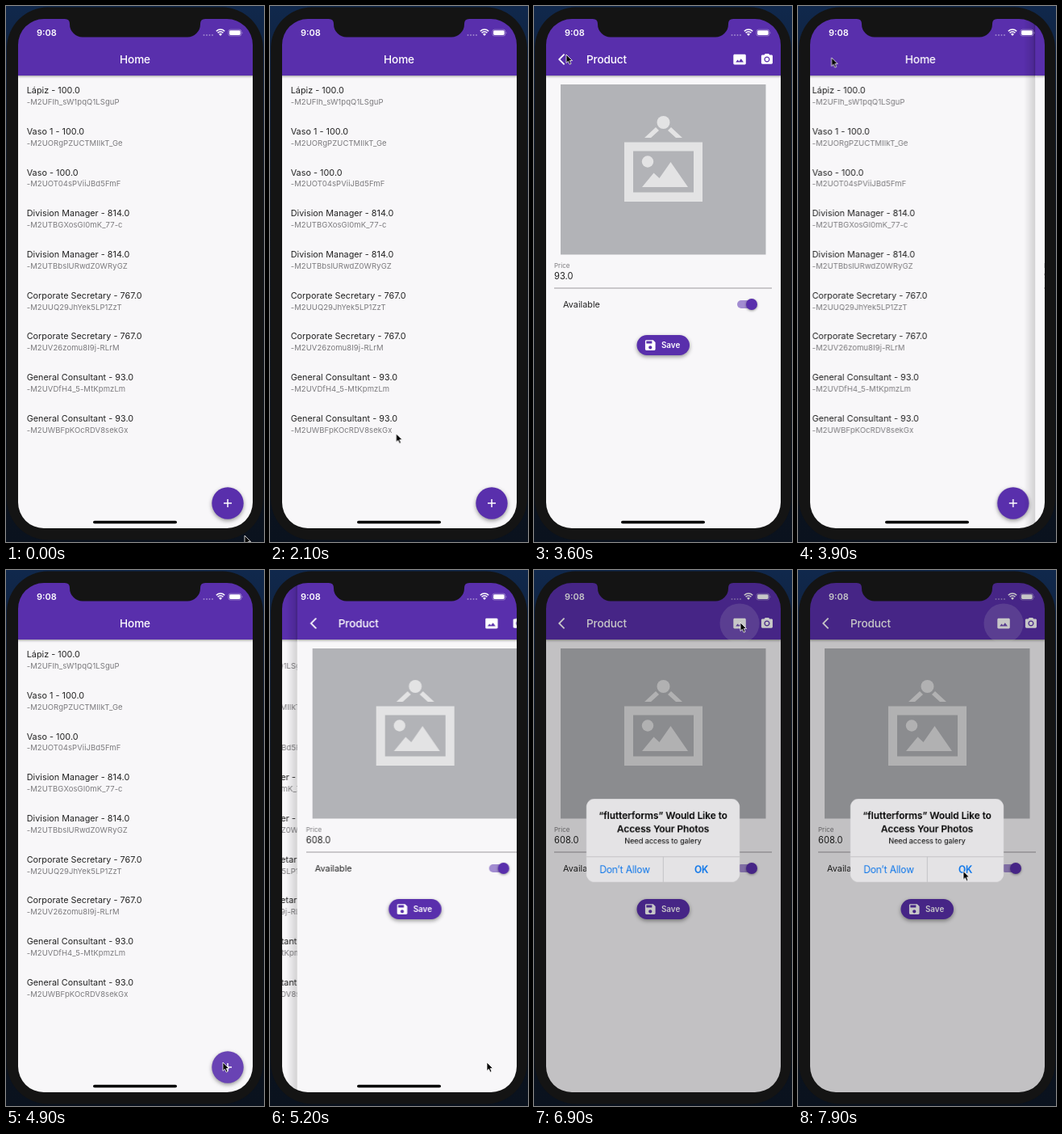
Recreate the animation shown at these times as an HTML page. Size 320x663 px, loop 8000 ms.

```html
<!DOCTYPE html>
<html lang="en">
<head>
<meta charset="utf-8">
<title>Product list demo</title>
<style>
  html, body { margin: 0; width: 100%; height: 100%; overflow: hidden; background: #0d1c33; }
  svg { display: block; width: 100%; height: 100%; font-family: Inter, Roboto, sans-serif; }
  .purple { fill: #592fac; }
  .white { fill: #fff; }
  .bezel { fill: #141414; fill-rule: evenodd; }
  .bar { filter: drop-shadow(0 1.5px 1.5px rgba(0, 0, 0, .4)); }
  .raised { filter: drop-shadow(0 2.5px 2.5px rgba(0, 0, 0, .4)); }
  .heading { font-size: 13.6px; font-weight: 500; fill: #fff; letter-spacing: -.15px; }
  .item { font-size: 10.8px; fill: #222; letter-spacing: .03px; }
  .key { font-size: 9.5px; fill: #7b7a7d; letter-spacing: .07px; }
  .label { font-size: 8px; fill: #7b7a7d; }
  .value { font-size: 11.1px; fill: #222; }
  .save { font-size: 9.8px; font-weight: 600; fill: #fff; }
  .clock { font-size: 11px; font-weight: 600; fill: #fff; }
  .ask { font-size: 11.95px; font-weight: 600; text-anchor: middle; letter-spacing: -.07px; }
  .why { font-size: 9.1px; text-anchor: middle; letter-spacing: -.05px; }
  .choice { font-size: 12px; fill: #0a75ea; text-anchor: middle; letter-spacing: -.15px; }
  #alert { transform-origin: 160px 334px; }
  #splash { transform-origin: 255px 66px; }
  #fabSplash { transform-origin: 275px 615px; }
</style>
</head>
<body>
<svg viewBox="0 0 320 663">
  <defs>
    <clipPath id="glass"><rect x="10" y="10" width="301" height="641" rx="36"/></clipPath>
    <linearGradient id="desk" x2="0" y2="1">
      <stop offset="0" stop-color="#10284c"/>
      <stop offset=".4" stop-color="#10151f"/>
      <stop offset="1" stop-color="#0a121e"/>
    </linearGradient>
    <linearGradient id="edge">
      <stop offset="0" stop-opacity="0"/>
      <stop offset="1" stop-opacity=".16"/>
    </linearGradient>
  </defs>

  <rect width="320" height="663" fill="url(#desk)"/>

  <g clip-path="url(#glass)">
    <g id="home">
      <rect x="14" y="15" width="293" height="633" fill="#f8f7f9"/>
      <g id="list"></g>
      <rect class="purple bar" x="14" y="14" width="293" height="72"/>
      <text class="heading" x="160" y="71" text-anchor="middle">Home</text>
      <circle class="purple raised" cx="275" cy="615" r="19.7"/>
      <circle id="fabSplash" class="white" cx="275" cy="615" r="19.7" opacity="0"/>
      <path d="M270 615h10M275 610v10" stroke="#fff" stroke-width="1.5"/>
    </g>

    <g id="product">
      <rect x="0" y="15" width="14.5" height="633" fill="url(#edge)"/>
      <rect x="14" y="15" width="293" height="633" fill="#f8f7f9"/>
      <rect class="purple bar" x="14" y="14" width="293" height="72"/>
      <text class="heading" x="65" y="71">Product</text>
      <g class="white">
        <path transform="translate(30 57.6) scale(.704)" d="M11.67 3.87L9.9 2.1 0 12l9.9 9.9 1.77-1.77L3.54 12z"/>
        <circle id="glow" cx="255" cy="66" r="24.5" opacity="0"/>
        <circle id="splash" cx="255" cy="66" r="24.5" opacity="0"/>
        <path transform="translate(246.6 57.6) scale(.704)" d="M21 3H3C2 3 1 4 1 5v14c0 1.1.9 2 2 2h18c1 0 2-1 2-2V5c0-1-1-2-2-2zM5 17l3.5-4.5 2.5 3.01L14.5 11l4.5 6H5z"/>
        <g transform="translate(280.5 57.6) scale(.704)">
          <path d="M9 2L7.17 4H4c-1.1 0-2 .9-2 2v12c0 1.1.9 2 2 2h16c1.1 0 2-.9 2-2V6c0-1.1-.9-2-2-2h-3.17L15 2H9zm3 15c-2.76 0-5-2.24-5-5s2.24-5 5-5 5 2.24 5 5-2.24 5-5 5z"/>
          <circle cx="12" cy="12" r="3.2"/>
        </g>
      </g>

      <rect x="33" y="97" width="254.5" height="210.5" fill="#b2b3b7"/>
      <g fill="#e3e3e4">
        <circle cx="160.5" cy="144" r="8"/>
        <path d="M137 163L151 150L155 154L145 163ZM184 163L170 150L166 154L176 163Z"/>
        <path fill-rule="evenodd" d="M112 168.5H209V242H112ZM123 179.5V230.5H198V179.5Z"/>
        <circle cx="141" cy="192.5" r="7.2"/>
        <path d="M134 224L148.5 206.5L155.5 213L169.5 193L191 224Z"/>
      </g>

      <text class="label" x="25" y="324">Price</text>
      <text class="value" id="oldPrice" x="25" y="338">93.0</text>
      <text class="value" id="newPrice" x="25" y="338">608.0</text>
      <rect x="25" y="348.6" width="270" height=".8" fill="#858388"/>
      <text class="item" x="36" y="373">Available</text>
      <rect x="252" y="364" width="24" height="10" rx="5" fill="#a28cd1"/>
      <circle class="purple bar" cx="270" cy="369" r="7"/>

      <rect class="purple raised" x="127.5" y="407" width="65.5" height="25" rx="12.5"/>
      <path class="white" transform="translate(135.8 411.1) scale(.704)" d="M17 3H5c-1.11 0-2 .9-2 2v14c0 1.1.89 2 2 2h14c1.1 0 2-.9 2-2V7l-4-4zm-5 16c-1.66 0-3-1.34-3-3s1.34-3 3-3 3 1.34 3 3-1.34 3-3 3zm3-10H5V5h10v4z"/>
      <text class="save" x="158" y="423">Save</text>
    </g>

    <text class="clock" x="38" y="37">9:08</text>
    <g class="white">
      <g opacity=".4">
        <circle cx="245.5" cy="36" r="1"/><circle cx="249" cy="36" r="1"/>
        <circle cx="252.5" cy="36" r="1"/><circle cx="256" cy="36" r="1"/>
      </g>
      <path d="M266 37l-2-2.2a2.8 2.8 0 0 1 4 0z"/>
      <path d="M262.6 33.2a4.8 4.8 0 0 1 6.8 0M260.8 31.2a7.4 7.4 0 0 1 10.4 0" fill="none" stroke="#fff" stroke-width="1.6"/>
      <rect x="276" y="29.2" width="15.8" height="7.8" rx="2.2" fill="none" stroke="#fff" stroke-opacity=".5" stroke-width=".7"/>
      <rect x="277.1" y="30.3" width="13.6" height="5.6" rx="1.3"/>
      <path d="M292.7 31.7q1.3 1.4 0 2.8z" opacity=".6"/>
    </g>
    <rect id="pill" x="108" y="636.7" width="104" height="3.6" rx="1.8"/>

    <rect id="dim" x="14" y="14" width="293" height="634" opacity="0"/>
    <g id="alert" opacity="0">
      <rect x="65" y="283" width="190" height="103" rx="10" fill="#e4e3e5"/>
      <text class="ask" x="160" y="308">“flutterforms” Would Like to</text>
      <text class="ask" x="160" y="324">Access Your Photos</text>
      <text class="why" x="160" y="338">Need access to galery</text>
      <path d="M65 354.7H255M160.3 354.7V386" stroke="#bcbbbf" stroke-width=".7"/>
      <text class="choice" x="112.5" y="375">Don’t Allow</text>
      <text class="choice" x="207.5" y="375" font-weight="600">OK</text>
    </g>
  </g>

  <!-- Phone body with the screen cut out, then the notch -->
  <path class="bezel" d="M52 1.5H268a51 51 0 0 1 51 51V609.5a51 51 0 0 1 -51 51H52a51 51 0 0 1 -51 -51V52.5a51 51 0 0 1 51 -51Z
    M47 16H274a32 32 0 0 1 32 32V614a32 32 0 0 1 -32 32H47a32 32 0 0 1 -32 -32V48a32 32 0 0 1 32 -32Z"/>
  <path class="bezel" d="M73 15V16Q79 16 79 22V22.5a16 16 0 0 0 16 16H225a16 16 0 0 0 16 -16V22Q241 16 247 16V15Z"/>

  <g id="cursor">
    <path d="M0 0V10.5L2.4 8.3L4.1 12.2L6 11.4L4.3 7.6H7.6Z" stroke="#fff" stroke-width=".8" stroke-linejoin="round"/>
  </g>
</svg>

<script>
const LOOP = 8000;
const SLIDE = 'cubic-bezier(.35,.91,.33,.97)';
const GLIDE = 'ease-in-out';
const $ = id => document.getElementById(id);

const items = [
  ['Lápiz - 100.0', 'UFIh_sW1pqQ1LSguP'],
  ['Vaso 1 - 100.0', 'UORgPZUCTMIIkT_Ge'],
  ['Vaso - 100.0', 'UOT04sPViiJBd5FmF'],
  ['Division Manager - 814.0', 'UTBGXosGI0mK_77-c'],
  ['Division Manager - 814.0', 'UTBbslURwdZ0WRyGZ'],
  ['Corporate Secretary - 767.0', 'UUQ29JhYek5LP1ZzT'],
  ['Corporate Secretary - 767.0', 'UV26zomu8I9j-RLrM'],
  ['General Consultant - 93.0', 'UVDfH4_5-MtKpmzLm'],
  ['General Consultant - 93.0', 'UWBFpKOcRDV8sekGx'],
];

function addText(cls, y, str) {
  const el = document.createElementNS('http://www.w3.org/2000/svg', 'text');
  el.setAttribute('class', cls);
  el.setAttribute('x', 25.7);
  el.setAttribute('y', y);
  el.textContent = str;
  $('list').append(el);
}

items.forEach(([name, key], i) => {
  const y = 108.3 + i * 50.68;
  addText('item', y, name);
  addText('key', y + 13.8, '-M2' + key);
});

// Each step is [ms, value, easing towards the next step].
function play(id, prop, steps) {
  const frames = steps.map(([ms, value, easing = 'linear']) =>
    ({ offset: ms / LOOP, [prop]: value, easing }));
  frames.unshift({ ...frames[0], offset: 0, easing: 'linear' });
  frames.push({ ...frames[frames.length - 1], offset: 1 });
  $(id).animate(frames, { duration: LOOP, iterations: Infinity });
}

const at = (x, y = 0) => `translate(${x}px, ${y}px)`;
const size = s => `scale(${s})`;

// Open the page, go back, open it again.
function slide(id, closed, opened) {
  play(id, 'transform', [
    [2250, at(closed), SLIDE], [2700, at(opened)],
    [3680, at(opened), SLIDE], [4130, at(closed)],
    [4960, at(closed), SLIDE], [5410, at(opened)],
  ]);
}
slide('home', 0, -97);
slide('product', 306, 0);

play('oldPrice', 'opacity', [[4500, 1], [4500, 0]]);
play('newPrice', 'opacity', [[4500, 0], [4500, 1]]);

play('cursor', 'transform', [
  [50, at(296, 655), GLIDE], [1000, at(172, 546), GLIDE], [1700, at(156.5, 529)],
  [2600, at(156.5, 529), GLIDE], [3500, at(40, 60)],
  [3850, at(40, 60), GLIDE], [4700, at(269, 609)],
  [5300, at(269, 609), GLIDE], [6200, at(256, 65)],
  [7250, at(256, 65), GLIDE], [7850, at(205, 372.5)],
]);

play('fabSplash', 'opacity', [[4760, 0], [4800, .1], [5000, .1], [5250, 0]]);
play('fabSplash', 'transform', [[4760, size(.2)], [4900, size(1)]]);

play('glow', 'opacity', [[6250, 0], [6400, .06], [6700, .16]]);
play('splash', 'opacity', [[6250, 0], [6300, .25], [6450, .25], [6720, 0]]);
play('splash', 'transform', [[6250, size(.2)], [6400, size(.54)], [6650, size(1)]]);

play('dim', 'opacity', [[6520, 0, 'ease-out'], [6780, .22]]);
play('pill', 'opacity', [[6520, 1], [6700, 0]]);
play('alert', 'opacity', [[6520, 0, 'ease-out'], [6780, 1]]);
play('alert', 'transform', [[6520, size(1.15), 'ease-out'], [6800, size(1)]]);
</script>
</body>
</html>
```
